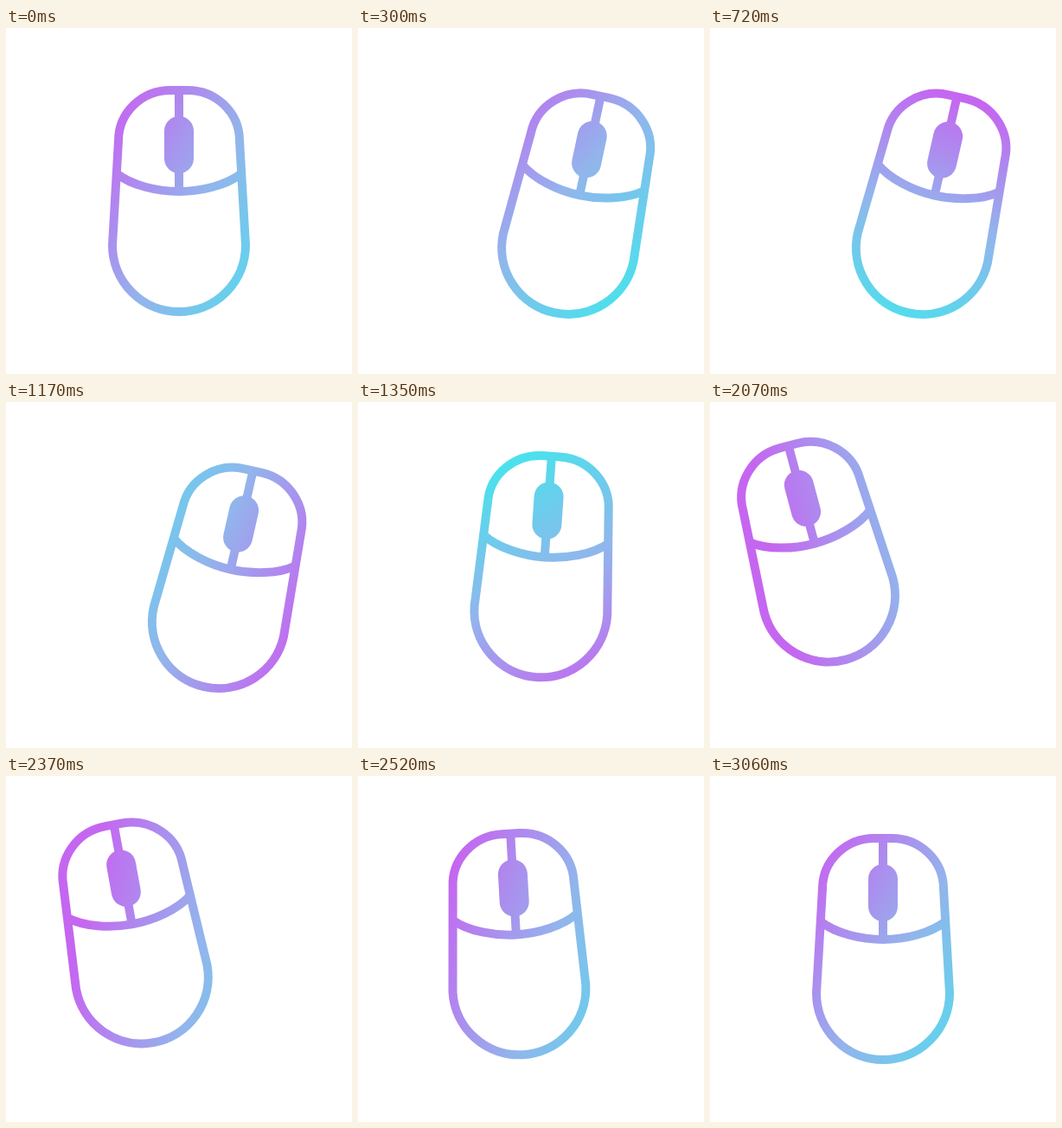
An HTML page with a canvas for the animation above (5.09 s loop, 400 by 400 pixels).

```html
<!DOCTYPE html>
<html lang="en">
<head>
<meta charset="utf-8">
<title>Computer mouse</title>
<style>
  html, body { margin: 0; width: 100%; height: 100%; overflow: hidden; background: #fff; }
  canvas { display: block; width: 400px; height: 400px; }
</style>
</head>
<body>
<canvas id="stage" width="400" height="400"></canvas>
<script>
const ctx = document.getElementById('stage').getContext('2d');
const LOOP = 5090;
const RAD = Math.PI / 180;

const outline = new Path2D(
  'M123 251 L130 130 A60 58.5 0 0 1 190 72 H210 A60 58.5 0 0 1 270 130 L277 251 A77 77 0 0 1 123 251 Z');
const buttons = new Path2D(
  'M127.5 168 C145 182 175 189 200 189 S255 182 272.5 168 M200 72 V189');
const wheel = new Path2D();
wheel.roundRect(183, 102, 34, 66, 17);

// x, y: where the middle of the body sits; angle in degrees
const rest = { x: 200, y: 200, angle: 0 };
const right = { x: 257.2, y: 204.3, angle: 12.8 };
const left = { x: 123.8, y: 174.2, angle: -15 };
// lift: how far the path bows upwards
const moves = [
  { start: 0, end: 390, from: rest, to: right, lift: 0 },
  { start: 1195, end: 1723, from: right, to: left, lift: 5 },
  { start: 2220, end: 2735, from: left, to: rest, lift: 0 },
];

// cubic-bezier(.3, 0, .42, 1)
function ease(u) {
  if (u <= 0) return 0;
  if (u >= 1) return 1;
  let low = 0, high = 1, s;
  for (let i = 0; i < 24; i++) {
    s = (low + high) / 2;
    const r = 1 - s;
    const x = 3 * s * r * r * 0.3 + 3 * s * s * r * 0.42 + s * s * s;
    if (x < u) low = s; else high = s;
  }
  return s * s * (3 - 2 * s);
}

function poseAt(t) {
  const { start, end, from, to, lift } = moves.filter(m => m.start <= t).pop();
  const k = ease((t - start) / (end - start));
  const mix = key => from[key] + (to[key] - from[key]) * k;
  return { x: mix('x'), y: mix('y') - 4 * lift * k * (1 - k), angle: mix('angle') };
}

// The gradient turns once around a fixed point of the stage, whatever the mouse does.
function gradientAt(t) {
  const angle = (31 + 360 * ease(t / 3030)) * RAD;
  const cx = 222, cy = 205;
  const dx = 140 * Math.cos(angle), dy = 140 * Math.sin(angle);
  const gradient = ctx.createLinearGradient(cx - dx, cy - dy, cx + dx, cy + dy);
  gradient.addColorStop(0, '#c566f0');
  gradient.addColorStop(0.5, '#92b5ec');
  gradient.addColorStop(1, '#4be1ec');
  return gradient;
}

function draw(t) {
  const pose = poseAt(t);
  ctx.clearRect(0, 0, 400, 400);
  ctx.save();
  ctx.translate(pose.x, pose.y);
  ctx.rotate(pose.angle * RAD);
  ctx.translate(-200, -200);
  ctx.lineWidth = 10;
  ctx.stroke(outline);
  ctx.stroke(buttons);
  ctx.fill(wheel);
  ctx.restore();

  ctx.save();
  ctx.globalCompositeOperation = 'source-in';
  ctx.fillStyle = gradientAt(t);
  ctx.fillRect(0, 0, 400, 400);
  ctx.restore();
}

const begin = performance.now();
function tick() {
  draw((performance.now() - begin) % LOOP);
  requestAnimationFrame(tick);
}
tick();
</script>
</body>
</html>
```
